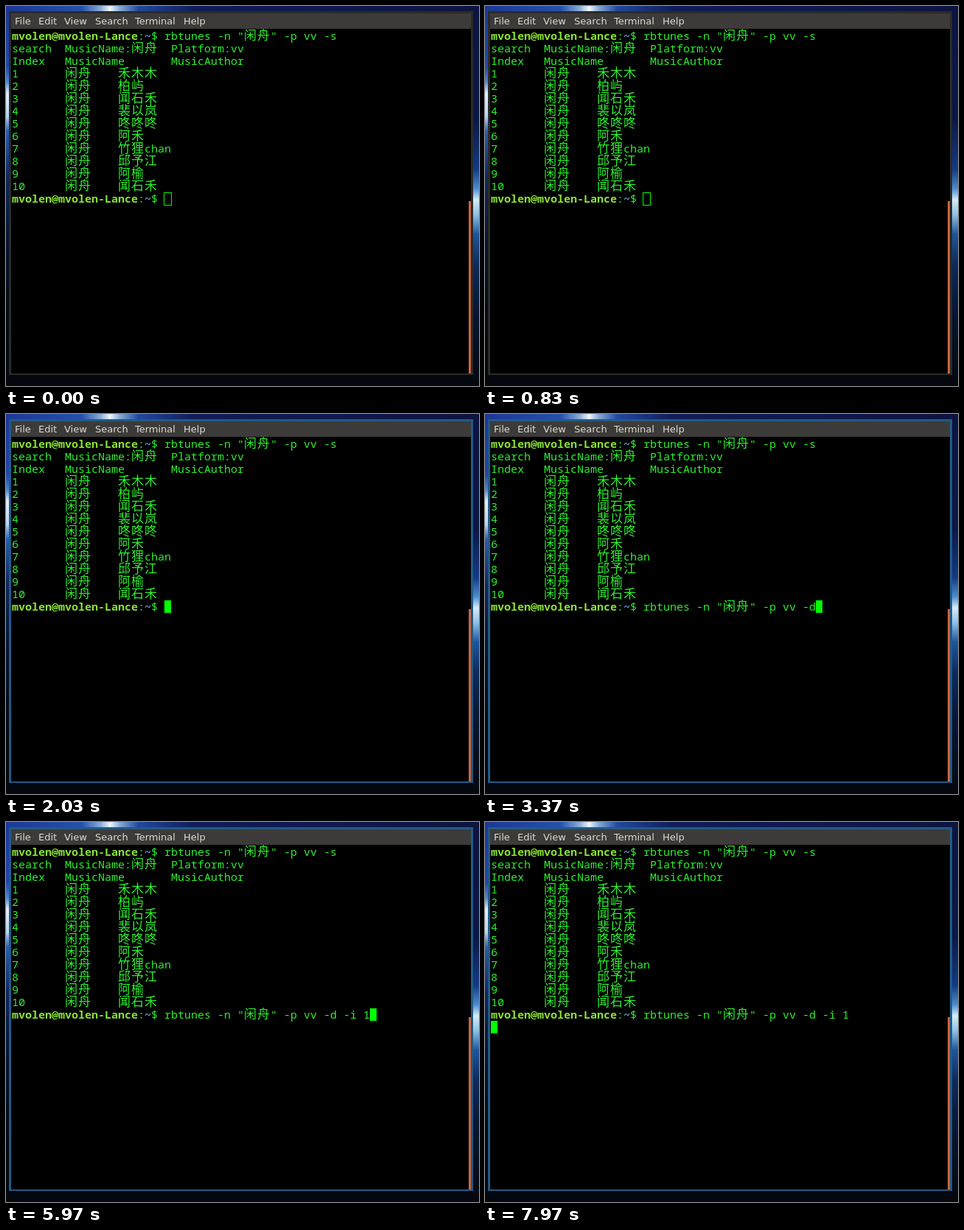
Animation, 642 px wide and 516 px high, one loop 8 s. Source, as an HTML page with a canvas:

```html
<!DOCTYPE html>
<html lang="en">
<head>
<meta charset="utf-8">
<title>Terminal</title>
<style>
html, body { margin: 0; width: 100%; height: 100%; overflow: hidden; background: #000; }
canvas { display: block; }
</style>
</head>
<body>
<canvas id="stage" width="642" height="516"></canvas>
<script>
const ctx = document.getElementById('stage').getContext('2d');
const LOOP = 8000, BLINK = 600, FOCUS = 1700;
const CELL = 9, LINE = 17, LEFT = 8, TOP = 32, BASELINE = 14;

const GREEN = '#2cf02c', PROMPT = '#8ae234', PATH = '#729fcf', CURSOR = '#00ff00';
const MONO = '"Noto Sans Mono", "DejaVu Sans Mono", monospace';
const HAN = '17px "Noto Sans CJK SC", "Noto Sans CJK JP", "Noto Sans CJK", sans-serif';

const SONG = '闲舟';
const ARTISTS = ['禾木木', '柏屿', '闻石禾', '裴以岚', '咚咚咚',
  '阿禾', '竹狸chan', '邱予江', '阿榆', '闻石禾'];
const BASE = `rbtunes -n "${SONG}" -p vv -`;

// Each key press: time, command line after it, whether it was entered
const KEYS = [
  [0, ''],
  [2650, BASE + 's'],
  [2950, BASE],
  [3250, BASE + 'd'],
  [3750, BASE + 'd '],
  [4050, BASE + 'd -'],
  [4900, BASE + 'd -i'],
  [5200, BASE + 'd -i '],
  [5500, BASE + 'd -i 1'],
  [7450, BASE + 'd -i 1', true]
];

const MENU = [['File', 12], ['Edit', 44], ['View', 79], ['Search', 121], ['Terminal', 175], ['Help', 241]];

function rect(color, x, y, w, h) {
  ctx.fillStyle = color;
  ctx.fillRect(x, y, w, h);
}

function gradient(x, y, w, h, stops) {
  const across = w > h;
  const g = ctx.createLinearGradient(x, y, across ? x + w : x, across ? y : y + h);
  stops.forEach(([at, color]) => g.addColorStop(at, color));
  rect(g, x, y, w, h);
}

// Writes on the character grid and returns the next free column
function write(text, col, row, color = GREEN, weight = 500) {
  ctx.fillStyle = color;
  for (const ch of text) {
    const wide = ch.codePointAt(0) > 0x2e80;
    ctx.font = wide ? HAN : `${weight} 15px ${MONO}`;
    ctx.fillText(ch, LEFT + col * CELL, TOP + row * LINE + BASELINE);
    col += wide ? 2 : 1;
  }
  return col;
}

function command(text, row) {
  let col = write('mvolen@mvolen-Lance', 0, row, PROMPT, 700);
  col = write(':', col, row);
  col = write('~', col, row, PATH, 700);
  return write('$ ' + text, col, row);
}

function wallpaper() {
  rect('#04070d', 0, 0, 642, 516);
  gradient(0, 0, 5, 516, [[0, '#1c3894'], [0.16, '#2148ac'], [0.2, '#4f86cc'], [0.23, '#e4f0fa'],
    [0.29, '#b8d6f0'], [0.33, '#2a5cae'], [0.45, '#10285c'], [0.6, '#071634'], [0.8, '#050a14'], [1, '#04070d']]);
  gradient(633, 0, 9, 516, [[0, '#0c1440'], [0.3, '#0a1846'], [0.43, '#143a84'],
    [0.48, '#4c8ccc'], [0.51, '#d4ecf8'], [0.55, '#8cc0e4'], [0.6, '#1f559c'],
    [0.68, '#0c2a5c'], [0.8, '#071634'], [1, '#04070d']]);
  gradient(0, 0, 642, 8, [[0, '#1c3894'], [0.16, '#2450ac'], [0.2, '#88acd8'], [0.22, '#f0f6fa'],
    [0.24, '#88acd8'], [0.28, '#20489c'], [0.4, '#101c58'], [1, '#0c1440']]);
}

function windowFrame(focused) {
  rect(focused ? '#235a86' : '#2b2b28', 4, 7, 630, 494);
  rect('#3c3b39', 7, 10, 624, 21);
  rect('#000', 7, 31, 624, 468);
  rect('#c8643f', 628, 265, 3, 234);
  ctx.font = '13px "DejaVu Sans", sans-serif';
  ctx.fillStyle = '#dfdbd2';
  MENU.forEach(([label, x]) => ctx.fillText(label, x, 25));
}

function listing() {
  command(BASE + 's', 0);
  write('search', 0, 1);
  write('MusicName:' + SONG, 8, 1);
  write('Platform:vv', 24, 1);
  write('Index', 0, 2);
  write('MusicName', 8, 2);
  write('MusicAuthor', 24, 2);
  ARTISTS.forEach((artist, i) => {
    write(String(i + 1), 0, i + 3);
    write(SONG, 8, i + 3);
    write(artist, 16, i + 3);
  });
}

function cursor(col, row, focused, visible) {
  const x = LEFT + col * CELL, y = TOP + row * LINE;
  if (!focused) {
    ctx.strokeStyle = CURSOR;
    ctx.lineWidth = 1;
    ctx.strokeRect(x - 0.5, y + 0.5, CELL + 1, LINE);
  } else if (visible) {
    rect(CURSOR, x, y, CELL, LINE);
  }
}

function draw(t) {
  const focused = t >= FOCUS;
  const [at, text, entered] = KEYS.filter(key => key[0] <= t).pop();
  const idle = t - Math.max(at, FOCUS);
  wallpaper();
  windowFrame(focused);
  listing();
  const end = command(text, 13);
  cursor(entered ? 0 : end, entered ? 14 : 13, focused, idle % (2 * BLINK) < BLINK);
}

const start = performance.now();
function tick() {
  draw((performance.now() - start) % LOOP);
  requestAnimationFrame(tick);
}
tick();
</script>
</body>
</html>
```
